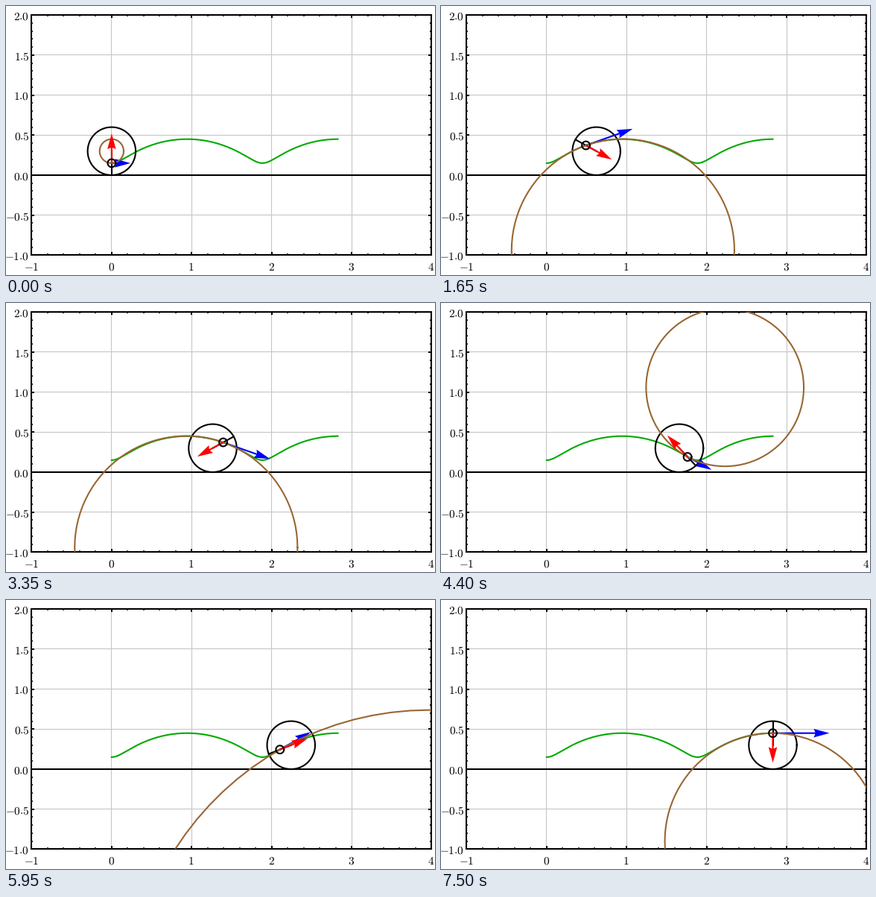
These frames come from a looping animation (576x361 px, 7550 ms). A matplotlib script:

```python
import numpy as np
import matplotlib.pyplot as plt
from matplotlib.animation import FuncAnimation
from matplotlib.ticker import AutoMinorLocator
from matplotlib.transforms import Affine2D

W, H, DPI = 576, 361, 100
LEFT, BOTTOM, UNIT = 34.45, 26.6, 107.4  # axes origin and data unit in pixels
FRAMES, INTERVAL = 151, 50
R, B = 0.3, 0.15                         # wheel radius, distance of the tracing point
OMEGA = np.pi / 2
DT = 0.04

plt.rcParams["mathtext.fontset"] = "cm"
plt.rcParams["text.hinting"] = "none"
plt.rcParams["axes.linewidth"] = 1.5


def position(phi):
    return np.array([R * phi - B * np.sin(phi), R - B * np.cos(phi)])


def velocity(phi):
    return OMEGA * np.array([R - B * np.cos(phi), B * np.sin(phi)])


def acceleration(phi):
    return OMEGA**2 * B * np.array([np.sin(phi), np.cos(phi)])


fig = plt.figure(figsize=(W / 100, H / 100), dpi=DPI, facecolor="white")
ax = fig.add_axes([LEFT / W, BOTTOM / H, 5 * UNIT / W, 3 * UNIT / H])
ax.set(xlim=(-1, 4), ylim=(-1, 2))

xticks, yticks = np.arange(-1, 5), np.arange(-1, 2.1, 0.5)
ax.set_xticks(xticks)
ax.set_yticks(yticks)
ax.xaxis.set_minor_locator(AutoMinorLocator(5))
ax.yaxis.set_minor_locator(AutoMinorLocator(5))
ax.tick_params(which="both", direction="in", top=True, right=True,
               labelbottom=False, labelleft=False)
ax.tick_params(which="major", length=3, width=1.4)
ax.tick_params(which="minor", length=1.5, width=1.2)

# half a pixel back, so each grid line fills the pixel its value falls in
grid = dict(color="#c6c6c6", lw=0.8, zorder=0.5,
            transform=ax.transData + Affine2D().translate(-0.5, 0.5))
for x in xticks[1:-1]:
    ax.plot([x, x], [-1, 2], **grid)
for y in yticks[1:-1]:
    ax.plot([-1, 4], [y, y], **grid)


def label(text, xy, shift, ha):
    ax.annotate(f"${text}$", xy, xytext=shift, textcoords="offset pixels",
                ha=ha, va="baseline", fontsize=11, annotation_clip=False)


for x in xticks:
    label(f"{x:d}", (x, -1), (-0.7, -20.5), "center")
for y in yticks:
    label(f"{y:.1f}", (-1, y), (-3.2, -6.5), "right")


def curve(color, z):
    return ax.plot([], [], color=color, lw=1.5, zorder=z)[0]


def arrow(color, z):
    return ax.quiver([0], [0], [1], [0], color=color, zorder=z, angles="xy",
                     scale_units="xy", scale=1, units="dots", width=2.1,
                     headwidth=5.5, headlength=10, headaxislength=9)


ax.axhline(0, color="black", lw=1.5, zorder=2)
path = curve("#00aa00", 3)
path.set_data(*position(np.linspace(0, 3 * np.pi, 400)))
wheel = curve("black", 4)
rod = curve("black", 4)
vel = arrow("blue", 5)
osculating = curve("#996633", 6)
acc = arrow("red", 7)
ring = curve("black", 8)
ax.set(xlim=(-1, 4), ylim=(-1, 2))

theta = np.linspace(0, 2 * np.pi, 101)
circle = np.array([np.cos(theta), np.sin(theta)])


def set_circle(line, center, radius):
    line.set_data(*(np.reshape(center, (2, 1)) + radius * circle))


def set_arrow(quiver, start, vec):
    quiver.set_offsets([start])
    quiver.set_UVC([vec[0]], [vec[1]])


def update(i):
    phi = OMEGA * DT * i
    p, v, a = position(phi), velocity(phi), acceleration(phi)
    hub = np.array([R * phi, R])
    rim = hub - R * np.array([np.sin(phi), np.cos(phi)])

    set_circle(wheel, hub, R)
    set_circle(ring, p, 0.05)
    rod.set_data([hub[0], rim[0]], [hub[1], rim[1]])
    set_arrow(vel, p, v)
    set_arrow(acc, p, a)

    # signed radius of curvature along the left normal
    speed = np.hypot(*v)
    radius = speed**3 / (v[0] * a[1] - v[1] * a[0])
    normal = np.array([-v[1], v[0]]) / speed
    set_circle(osculating, p + radius * normal, abs(radius))
    return wheel, ring, rod, vel, acc, osculating


anim = FuncAnimation(fig, update, frames=FRAMES, interval=INTERVAL,
                     repeat=True, repeat_delay=0, blit=False)
plt.show()
```
